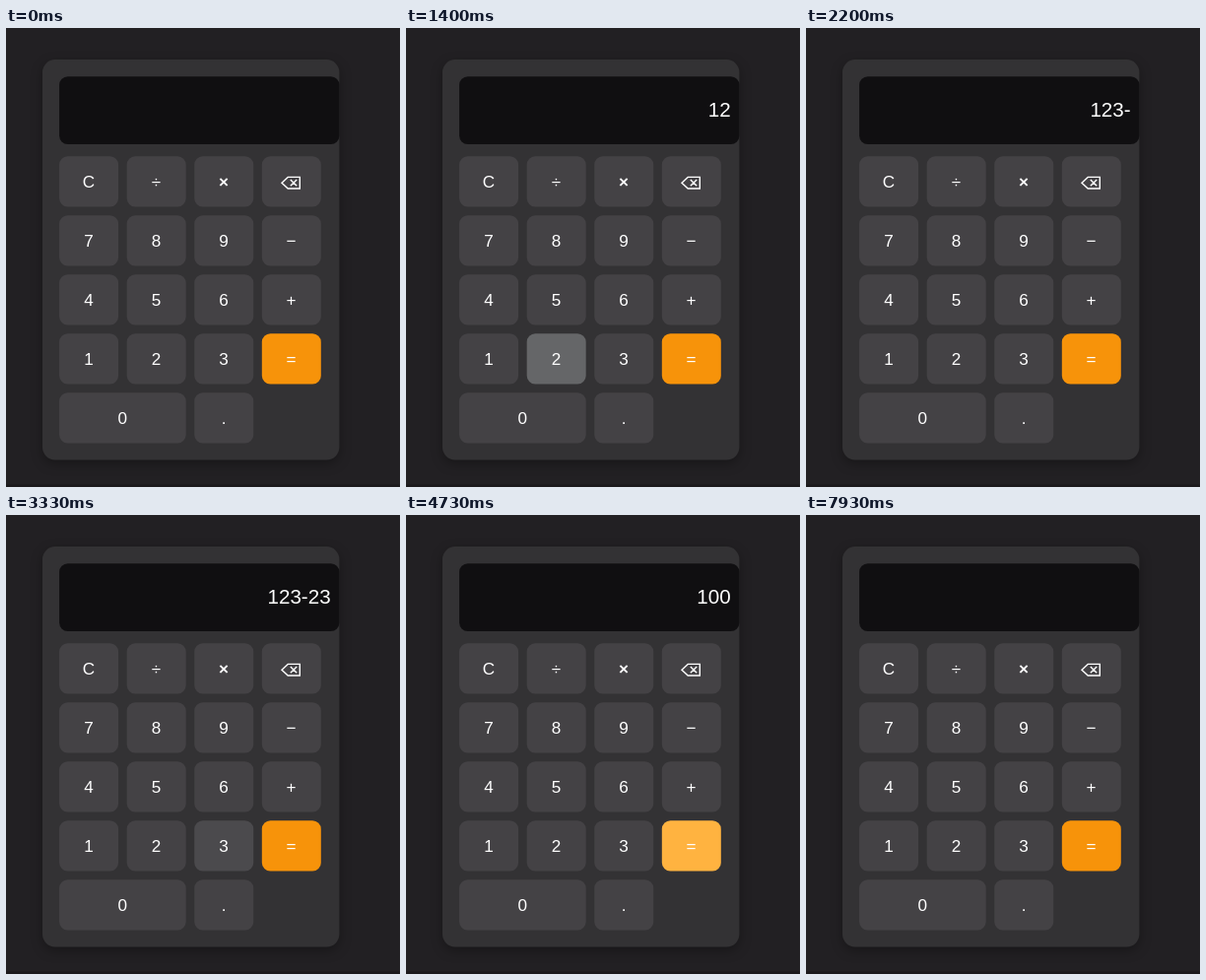
Recreate the animation shown at these times as an HTML page. Size 400x466 px, loop 8 s.

```html
<!DOCTYPE html>
<html lang="en">
<head>
<meta charset="utf-8">
<title>Calculator</title>
<style>
  html, body { margin: 0; width: 100%; height: 100%; overflow: hidden; background: #222023; }
  svg { display: block; width: 400px; height: 466px; }
  text { fill: #fff; font-family: "Liberation Sans", Arial, sans-serif; }
  .key text { font-size: 17.14px; text-anchor: middle; }
  .card { filter: drop-shadow(0 4px 6px rgba(0, 0, 0, .3)); }
</style>
</head>
<body>
<svg viewBox="0 0 400 466">
  <rect y="463.5" width="400" height="2.5" fill="#1b191c"/>
  <rect class="card" x="37" y="32.1" width="301.4" height="406.4" rx="12.9" fill="#333234"/>
  <rect x="54.1" y="49.3" width="284.3" height="68.6" rx="8.6" fill="#100f11"/>
  <text id="display" x="329.6" y="90.4" font-size="20.57" text-anchor="end"></text>
  <g id="keys"></g>
</svg>
<script>
const LOOP = 8000, HOLD = 170, FADE = 40;
const GRAY = [68, 66, 69], GRAY_LIT = [101, 102, 104];
const ORANGE = [247, 147, 10], ORANGE_LIT = [255, 179, 64];

// Each press: time, key, resulting display.
const presses = [
  [1060, '1', '1'], [1270, '2', '12'], [1490, '3', '123'],
  [1940, '−', '123-'],
  [2790, '2', '123-2'], [3130, '3', '123-23'],
  [4720, '=', '100'],
  [6860, 'C', '']
];

const display = document.getElementById('display');
const keyLayer = document.getElementById('keys');
const keys = {};

function add(parent, tag, attributes) {
  const node = document.createElementNS('http://www.w3.org/2000/svg', tag);
  for (const name in attributes) node.setAttribute(name, attributes[name]);
  return parent.appendChild(node);
}

function addKey(label, column, row, span = 1) {
  const x = 54.1 + column * 68.57, y = 130.2 + row * 60;
  const width = 60 + (span - 1) * 68.57;
  const group = add(keyLayer, 'g', { class: 'key' });
  const face = add(group, 'rect', { x, y, width, height: 51.4, rx: 8.6 });
  if (label === '⌫') {
    add(group, 'path', {
      d: 'M280 157.2L286.2 151.4H298.3V163H286.2ZM288.8 154.1L295.2 160.3M295.2 154.1L288.8 160.3',
      fill: 'none', stroke: '#fff', 'stroke-width': 1.4
    });
  } else {
    const text = add(group, 'text', { x: x + width / 2 - .2, y: y + 31.7 });
    if (label === '×') text.setAttribute('font-weight', 'bold');
    text.textContent = label;
  }
  keys[label] = face;
}

['C÷×⌫', '789−', '456+', '123='].forEach((labels, row) =>
  [...labels].forEach((label, column) => addKey(label, column, row)));
addKey('0', 0, 4, 2);
addKey('.', 2, 4);

const clamp = value => Math.max(0, Math.min(1, value));
const glow = age => clamp((age + FADE) / FADE) * clamp((HOLD + FADE - age) / FADE);
const mix = (from, to, k) => `rgb(${from.map((v, i) => Math.round(v + (to[i] - v) * k))})`;

function render(time) {
  let shown = '';
  const lit = {};
  for (const [start, label, result] of presses) {
    if (time >= start) shown = result;
    lit[label] = Math.max(lit[label] || 0, glow(time - start));
  }
  display.textContent = shown;
  for (const label in keys) {
    const [base, bright] = label === '=' ? [ORANGE, ORANGE_LIT] : [GRAY, GRAY_LIT];
    keys[label].setAttribute('fill', mix(base, bright, lit[label] || 0));
  }
}

const begin = performance.now();
function tick() {
  render((performance.now() - begin) % LOOP);
  requestAnimationFrame(tick);
}
tick();
</script>
</body>
</html>
```
